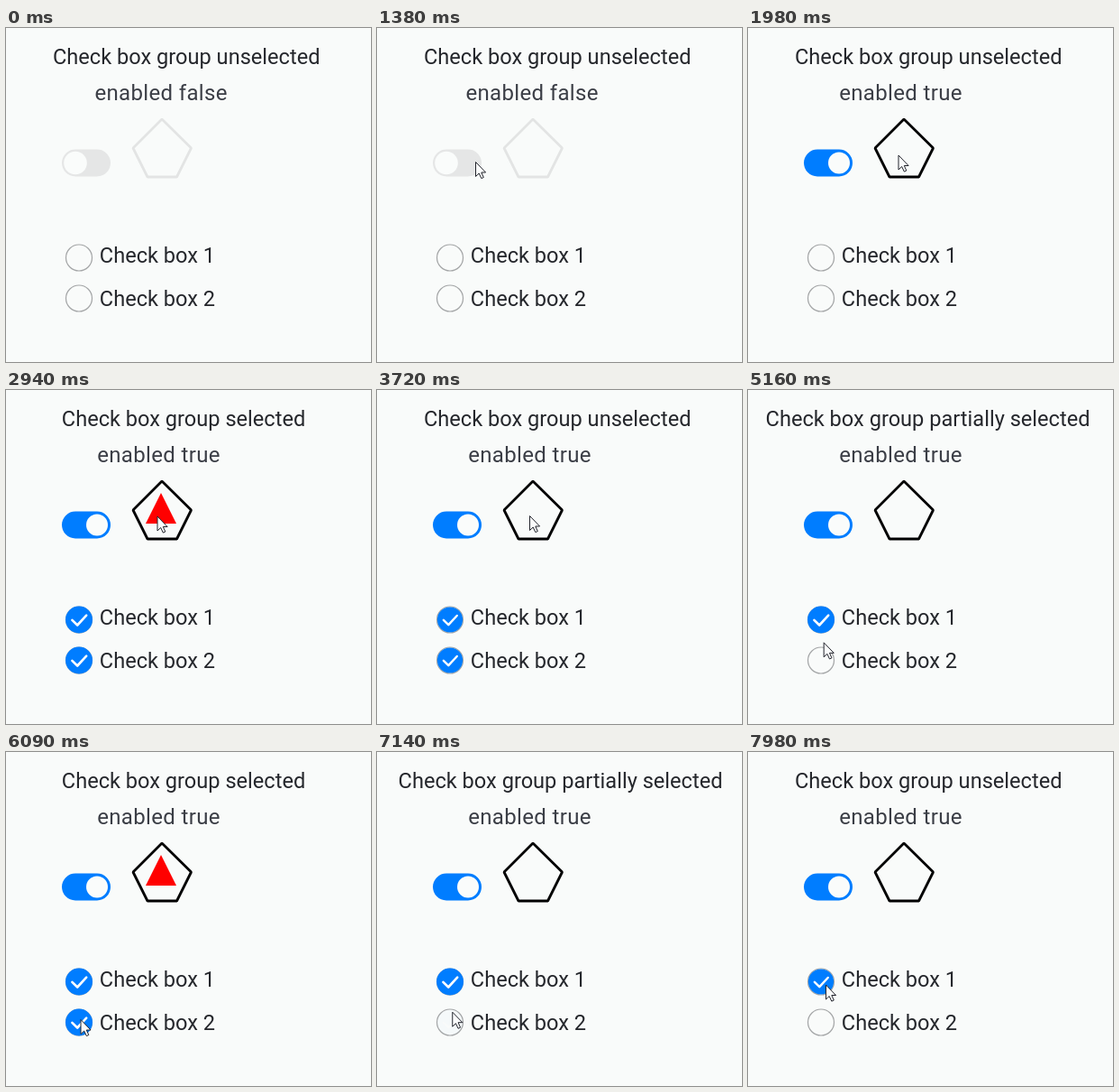
An HTML page for the animation above (8000 ms loop, 405x370 px).

```html
<!DOCTYPE html>
<html lang="en">
<head>
<meta charset="utf-8">
<title>Check box group</title>
<style>
  html, body { margin: 0; width: 100%; height: 100%; overflow: hidden; background: #f9fbfa; }
  svg { display: block; width: 405px; height: 370px; }
  text { font: 23.6px Roboto, "Open Sans", sans-serif; fill: #25272c; }
  #state { font-size: 24px; letter-spacing: .35px; fill: #3b3e46; }
  .ring { fill: none; stroke: #a3a5a6; stroke-width: 1.2; }
  .tick { fill: none; stroke: #fff; stroke-width: 2.6; stroke-linecap: round; stroke-linejoin: round; }
</style>
</head>
<body>
<svg viewBox="0 0 405 370">
  <text id="title" y="40"></text>
  <text id="state" y="80"></text>

  <rect id="track" x="62" y="134.5" width="54" height="30" rx="15"/>
  <circle id="thumb" cy="149.5" fill="#fafcfb"/>

  <path id="pentagon" d="M173 101 141 133 157 165H189.5L205.5 133Z" fill="none" stroke="#000" stroke-width="2.8" stroke-linejoin="bevel"/>
  <path id="triangle" d="M172 114 189 148H155Z" fill="#f00"/>

  <g id="boxes"></g>
  <text x="103.8" y="260">Check box 1</text>
  <text x="103.8" y="308">Check box 2</text>

  <path id="cursor" d="M.5 .5V16.5L4.2 13 6.8 18.6 9.3 17.5 6.8 12H11.6Z" fill="#fbfcfc" stroke="#22242c" stroke-width="1" stroke-linejoin="round"/>
</svg>
<script>
const LOOP = 8000;
const $ = id => document.getElementById(id);
const clamp = v => Math.min(1, Math.max(0, v));
const ease = v => v * v * (3 - 2 * v);
const ramp = (t, from, length) => ease(clamp((t - from) / length));
const mix = (a, b, p) => a + (b - a) * p;

// time, title suffix, left edge
const titles = [
  [0, 'unselected', 52],
  [2550, 'selected', 61.8],
  [3630, 'unselected', 52],
  [4710, 'partially selected', 19.6],
  [5790, 'selected', 61.8],
  [6900, 'partially selected', 23.6],
  [7890, 'unselected', 52]
];

// time, x, y of the pointer tip
const path = [
  [180, 396, 79], [480, 240, 122], [720, 104, 147], [810, 109, 148],
  [1500, 109, 148], [1980, 166.5, 140.5],
  [2940, 167.5, 139.5], [3150, 169, 139],
  [3720, 169, 139], [4260, 86, 247],
  [4830, 86, 247], [5370, 82.5, 295.5],
  [5610, 82.5, 296], [7000, 82.5, 296], [7470, 86, 257.5]
];

// checked spans of each box
const boxes = [
  { y: 254.5, spans: [[2550, 3630], [4710, 7890]] },
  { y: 299.5, spans: [[2550, 3630], [5790, 6900]] }
];

$('boxes').innerHTML = boxes.map(b => `
  <g transform="translate(81 ${b.y})">
    <circle class="ring" r="14.5"/>
    <g class="mark"><circle r="15" fill="#007dff"/><path class="tick" d="M-7.6 .4-1.8 6 8.2-4.8"/></g>
  </g>`).join('');
const marks = document.querySelectorAll('.mark');

const last = (rows, t) => rows.filter(r => r[0] <= t).pop();

function pointer(t) {
  const i = path.findIndex(p => p[0] > t);
  if (i < 0) return path[path.length - 1].slice(1);
  const [t0, x0, y0] = path[i - 1], [t1, x1, y1] = path[i];
  let p = (t - t0) / (t1 - t0);
  if (t0 >= 810) p = ease(p);
  return [mix(x0, x1, p), mix(y0, y1, p)];
}

function drawMark(mark, spans, t) {
  const span = spans.find(([on, off]) => t >= on && t < off + 260);
  if (!span) return mark.setAttribute('opacity', 0);
  const [on, off] = span;
  const shrink = 1 - .06 * ramp(t, off + 30, 60);
  mark.setAttribute('opacity', ramp(t, on - 30, 180) * (1 - ramp(t, off + 100, 150)));
  mark.setAttribute('transform', `scale(${shrink})`);
}

function render(t) {
  const [, status, left] = last(titles, t);
  $('title').textContent = 'Check box group ' + status;
  $('title').setAttribute('x', left);
  $('triangle').setAttribute('visibility', status === 'selected' ? 'visible' : 'hidden');

  const enabled = t >= 1410;
  $('state').textContent = 'enabled ' + enabled;
  $('state').setAttribute('x', enabled ? 101.2 : 98.4);
  $('pentagon').setAttribute('opacity', enabled ? 1 : .09);

  const p = ramp(t, 1400, 200);
  const [r, g, b] = [[229, 0], [230, 125], [230, 255]].map(c => Math.round(mix(...c, p)));
  $('track').setAttribute('fill', `rgb(${r},${g},${b})`);
  $('thumb').setAttribute('cx', mix(77, 101, p));
  $('thumb').setAttribute('r', mix(12.8, 12, p));

  marks.forEach((m, i) => drawMark(m, boxes[i].spans, t));

  const shown = t >= 180;
  $('cursor').setAttribute('visibility', shown ? 'visible' : 'hidden');
  if (shown) $('cursor').setAttribute('transform', `translate(${pointer(t)})`);
}

const start = performance.now();
function tick() {
  render((performance.now() - start) % LOOP);
  requestAnimationFrame(tick);
}
tick();
</script>
</body>
</html>
```
